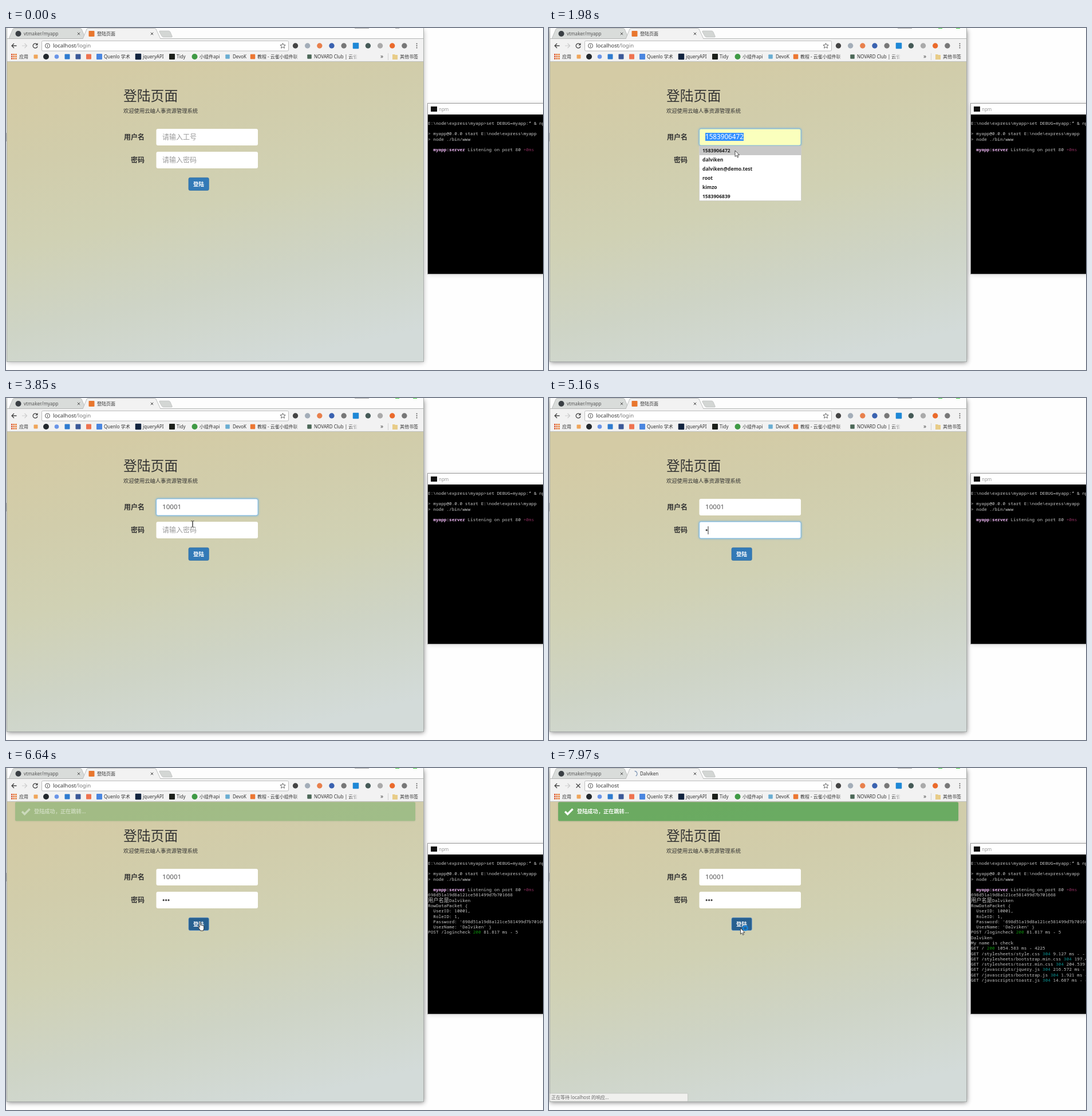
Write an HTML page that moves like this. It is 938 px wide and 597 px high and loops after 8 s.

```html
<!DOCTYPE html>
<html lang="zh">
<head>
<meta charset="utf-8">
<title>登陆页面</title>
<style>
html, body { margin: 0; width: 100%; height: 100%; overflow: hidden; background: #fefefe }
svg { display: block; width: 938px; height: 597px }
text { font-family: "Noto Sans", "Noto Sans CJK SC", sans-serif; white-space: pre }
.mono { font-family: "Noto Sans Mono", "Noto Sans CJK SC", monospace }
</style>
</head>
<body>
<svg viewBox="0 0 938 597">
  <defs>
    <linearGradient id="page" x1=".34" y1="0" x2=".66" y2="1">
      <stop offset="0" stop-color="#d4cba5"/>
      <stop offset=".22" stop-color="#d1cdab"/>
      <stop offset=".47" stop-color="#d0d1b4"/>
      <stop offset=".73" stop-color="#ced4c6"/>
      <stop offset="1" stop-color="#d3dbd9"/>
    </linearGradient>
    <linearGradient id="fade">
      <stop offset="0" stop-color="#f2f2f2" stop-opacity="0"/>
      <stop offset="1" stop-color="#f2f2f2"/>
    </linearGradient>
    <filter id="blur" x="-10%" y="-10%" width="120%" height="120%"><feGaussianBlur stdDeviation="4"/></filter>
    <filter id="glow" x="-10%" y="-40%" width="120%" height="180%"><feGaussianBlur stdDeviation="1.4"/></filter>
  </defs>
  <g id="base"></g>
  <g id="live"></g>
</svg>
<script>
const LOOP = 8000, USER = 'Dalviken', HASH = '698d51a19d8a121ce581499d7b701668';
const base = document.getElementById('base'), live = document.getElementById('live');

const text = (x, y, size, str, fill = '#333', more = '') =>
  `<text x="${x}" y="${y}" font-size="${size}" fill="${fill}" ${more}>${str}</text>`;
const rect = (x, y, w, h, fill, more = '') =>
  `<rect x="${x}" y="${y}" width="${w}" height="${h}" fill="${fill}" ${more}/>`;
const dot = (x, y, r, fill, more = '') => `<circle cx="${x}" cy="${y}" r="${r}" fill="${fill}" ${more}/>`;
const path = (d, fill, stroke = 'none', w = 1, more = '') =>
  `<path d="${d}" fill="${fill}" stroke="${stroke}" stroke-width="${w}" ${more}/>`;
const square = (x, y, s, fill) => rect(x - s / 2, y - s / 2, s, s, fill, 'rx="1"');
const bold = 'font-weight="700"';
const cross = (x, y, s, color, w) => path(`M${x - s} ${y - s}l${2 * s} ${2 * s}m0 ${-2 * s}l${-2 * s} ${2 * s}`, 'none', color, w);

function drawBase() {
  let s = rect(0, 0, 938, 597, '#fefefe') + rect(0, 183, 1.5, 15, '#bbb');
  s += rect(2, 4, 728, 580, '#000', 'id="shade" filter="url(#blur)"');
  s += rect(1, -2, 729, 585, '#a9adab') + rect(2, -2, 727, 20, '#fdfdfd');
  s += rect(609, 0, 25, 1, '#aaa');

  // tabs
  s += path('M5 18.5L12 2Q13 .5 15 .5H129Q131 .5 132 2L139 18.5Z', '#d9dcda', '#b0b3b1', .8);
  s += rect(2, 18, 727, 1, '#b4b6b5');
  s += path('M134 19L141 2Q142 .5 144 .5H259Q261 .5 262 2L270 19', '#f2f2f2', '#b0b3b1', .8);
  s += path('M268 7Q267 5 269 5H284Q286 5 287 7L290 14Q291 16 289 16H275Q273 16 272 14Z', '#d3d6d4', '#b4b6b5', .6);
  s += dot(21.5, 10, 5, '#3a3f44') + text(31, 12.8, 8.1, 'vtmaker/myapp', '#555');
  s += cross(127, 10, 2.2, '#555', 1) + cross(255, 10, 2.2, '#444', 1);

  // toolbar
  s += rect(2, 19, 727, 39, '#f2f2f2') + rect(2, 58, 727, 1, '#bfc1bd');
  s += path('M18.5 31H10M14 27l-4 4 4 4', 'none', '#444', 1.3);
  s += path('M28 31h8.5M32.5 27l4 4-4 4', 'none', '#ccc', 1.2);
  s += rect(62.5, 22.5, 431, 17.5, '#fff', 'rx="2" stroke="#bcbcbc"');
  s += dot(72.5, 31, 4, 'none', 'stroke="#555"') + rect(72, 30.2, 1, 3.2, '#555') + rect(72, 28.6, 1, 1, '#555');
  s += path('M483.5 26.5l1.3 3 3.3.3-2.5 2.2.8 3.2-2.9-1.7-2.9 1.7.8-3.2-2.5-2.2 3.3-.3Z', 'none', '#555', .9);
  ['#444', '#a3adb8', '#e8804c', '#3a62b0', '#777', '#1e88d6', '#455a57', '#aaa', '#ea6a2b', '#777'].forEach((c, i) =>
    s += i == 5 ? square(611, 31, 10.5, c) : dot(505.5 + 21.15 * i, 31, 4.7, c));
  for (let i = -1; i < 2; i++) s += dot(717.5, 31 + 3.6 * i, 1, '#555');

  // bookmarks
  for (let i = 0; i < 9; i++) s += rect(9 + i % 3 * 3.6, 45 + (i / 3 | 0) * 3.6, 2.5, 2.5, i % 3 ? '#e8742c' : '#d9512c');
  s += square(52, 50, 7, '#efa55a') + dot(70, 50, 5, '#24292e') + dot(88.5, 50, 3.8, '#6a95e8');
  s += square(107, 50, 9, '#2f7cd0') + square(126, 50, 9, '#3b5998') + square(144.5, 50, 9, '#ee7350');
  s += square(163, 50, 10, '#4a86e0') + square(231, 50, 10.5, '#12243f') + square(290, 50, 10, '#1d211c');
  s += dot(329.5, 50, 5, '#3f9a45') + square(387, 50, 7.5, '#6aaed2') + square(431, 50, 8.5, '#ec7733') + square(530, 50, 7.5, '#4c6858');
  [[23, '应用'], [171, 'Quenlo 学术'], [239, 'jqueryAPI'], [298, 'Tidy'], [338, '小组件api'], [396, 'DevoK'],
    [439, '教程 - 云雀小组件联'], [538, 'NOVARD Club | 云雀'], [688, '其他书签']]
    .forEach(([x, str]) => s += text(x, 53, 8, str));
  s += rect(502, 44, 14, 12, 'url(#fade)') + rect(516, 44, 9, 12, '#f2f2f2');
  s += rect(600, 44, 15, 12, 'url(#fade)') + rect(615, 44, 30, 12, '#f2f2f2');
  s += text(654, 53, 10, '»', '#444') + rect(667, 44, 1, 12, '#d0d0d0');
  s += path('M675 46h4l1 1h4v8h-9Z', '#e8cc88');

  // page
  s += rect(2, 59, 727, 523, 'url(#page)');
  s += text(205, 127.2, 23.8, '登陆页面') + text(205, 148, 9.3, '欢迎使用云岫人事资源管理系统');
  s += text(206, 194.8, 12, '用户名', '#333', bold) + text(218, 234.8, 12, '密码', '#333', bold);

  // terminal window
  s += rect(738, 133, 210, 297, '#000', 'filter="url(#blur)" opacity=".2"');
  s += rect(736.5, 131.5, 210, 298, '#fff', 'stroke="#999"') + rect(737, 151, 201, 278, '#000');
  s += rect(742, 137, 11, 9, '#111') + text(756, 144.5, 8, 'npm', '#999');
  base.innerHTML = s;
}

const mono = (str, fill) => `<tspan fill="${fill}">${str}</tspan>`;
const get = (file, tail) => `GET /${file} ${tail}`;
// [time shown, row, line]
const log = [
  [0, 0, String.raw`E:\node\express\myapp&gt;set DEBUG=myapp:* &amp; npm start`],
  [0, 2, String.raw`&gt; myapp@0.0.0 start E:\node\express\myapp`],
  [0, 3, '&gt; node ./bin/www'],
  [0, 5, `  <tspan fill="#eab4f0" ${bold}>myapp:server</tspan> Listening on port 80 ${mono('+0ms', '#8a2c5c')}`],
  [6240, 6, HASH],
  [6240, 7, `<tspan font-size="9.28">用户名是</tspan>${USER}`],
  [6400, 8, 'RowDataPacket {'],
  [6400, 9, '  UserID: 10001,'],
  [6400, 10, '  RoleID: 1,'],
  [6400, 11, `  Password: '${HASH}',`],
  [6400, 12, `  UserName: '${USER}' }`],
  [6480, 13, 'POST /logincheck 200 81.817 ms - 5'],
  [6720, 14, USER],
  [6720, 15, 'My name is check'],
  [7330, 16, get('', '200 1054.583 ms - 4225')],
  [7560, 17, get('stylesheets/style.css', '304 9.127 ms - -')],
  [7720, 18, get('stylesheets/bootstrap.min.css', '304 197.482 ms - -')],
  [7720, 19, get('stylesheets/toastr.min.css', '304 204.539 ms - -')],
  [7800, 20, get('javascripts/jquery.js', '304 216.572 ms - -')],
  [7880, 21, get('javascripts/bootstrap.js', '304 1.921 ms - -')],
  [7960, 22, get('javascripts/toastr.js', '304 14.687 ms - -')]
];
const paint = line => line.replace(/ (200|304) /, (m, n) => mono(m, n == 200 ? '#0c8f0c' : '#0a8f8f'));

// [time, x, y, shape]; an empty shape hides the pointer
const moves = [
  [0, 0, 0, ''], [350, 814, 579, 'arrow'], [430, 740, 500, 'arrow'], [510, 610, 408, 'arrow'],
  [590, 480, 330, 'arrow'], [670, 390, 289, 'arrow'], [740, 340, 269, 'hand'], [810, 336, 254, 'arrow'],
  [890, 328, 215, 'beam'], [970, 325, 187, 'beam'], [1830, 325, 196, 'beam'], [1900, 325, 208, 'arrow'],
  [1980, 325, 214, 'arrow'], [2420, 0, 0, ''], [3850, 326, 220, 'beam'], [3930, 326, 226, 'beam'],
  [4000, 325.5, 230.5, 'beam'], [4470, 0, 0, ''], [5630, 326, 231, 'beam'], [5710, 328, 240, 'beam'],
  [5780, 333, 254, 'arrow'], [5850, 336, 267, 'hand'], [5920, 336, 269, 'hand'], [6800, 338, 269, 'hand'],
  [7560, 337, 276, 'busy'], [7640, 334.5, 279.5, 'busy']
];
const arrow = path('M0 0V10.5L2.5 8.3 4.2 12 5.9 11.2 4.3 7.7H7.5Z', '#fff', '#222', .8);
const shapes = {
  '': '',
  arrow,
  beam: path('M-2.5-5.5Q0-5.5 0-4.5V4.5Q0 5.5-2.5 5.5M2.5-5.5Q0-5.5 0-4.5V4.5Q0 5.5 2.5 5.5', 'none', '#333', .9),
  hand: path('M2.2 1.2Q2.2 0 3.2 0T4.2 1.2V5.3Q5.5 4.8 6.2 5.7 7.3 5.2 8 6.3 9.7 6.2 9.7 7.8V11.5L8.5 15H3.7L.3 9.8Q-.4 8.5.6 8.1T2.2 9.3Z', '#fff', '#222', .9),
  busy: dot(8.5, 0, 3.8, 'none', 'stroke="#1783d8" stroke-width="2.4"') + arrow
};

const last = (list, t) => list.filter(k => k[0] <= t).pop();

function field(y, focus, fill = '#fff') {
  const box = (color, more = '') => rect(262.5, y, 177.5, 29, color, `rx="3" ${more}`);
  if (!focus) return box(fill);
  return box('none', 'stroke="#66afe9" stroke-width="3" filter="url(#glow)" opacity=".6"') +
    box(fill, 'stroke="#66afe9" stroke-width=".8"');
}

const all = ['1583906472', 'dalviken', 'dalviken@demo.test', 'root', 'kimzo', '1583906839'];
const ones = ['1583906472', '1583906839', '1029', '12', '1360', '11'];
function menu(t) {
  const items = t < 2420 ? all : t < 2660 ? ones : ['1029'];
  let s = rect(262.5, 206, 178, 16 * items.length - .5, '#fff', 'stroke="#c4c4c4" stroke-width=".6"');
  if (t >= 1900 && t < 2420) s += rect(263, 206, 177.5, 16, '#c8c8c8');
  items.forEach((str, i) => s += text(268, 217.3 + 15.9 * i, 8.5, str, '#222', bold));
  return s;
}

function form(t) {
  const preview = t >= 1900 && t < 2420;
  const typed = last([[0, 0], [2420, 1], [2660, 2], [2810, 3], [2980, 4], [3310, 5]], t)[1];
  const dots = last([[0, 0], [5160, 1], [5390, 2], [5550, 3]], t)[1];
  const userFocus = t >= 1120 && t < 4150, passFocus = t >= 4150 && t < 6000;
  const hover = t >= 740 && t < 810 || t >= 5850;
  const caret = (x, y) => rect(x, y, 1, 14, '#333');

  let s = field(176, userFocus, preview ? '#faffbd' : '#fff');
  if (preview) s += rect(273, 183, 67, 14, '#3390ff') + text(273, 194.3, 11.7, all[0], '#fff');
  else if (typed) s += text(273, 194.3, 11.6, '10001'.slice(0, typed), '#555');
  else s += text(273, 194.8, 12, '请输入工号', '#999');
  if (userFocus && !preview && t < 3850) s += caret(273 + 6.65 * typed, 183.5);

  s += field(216, passFocus);
  if (!dots) s += text(273, 234.8, 12, '请输入密码', '#999');
  for (let i = 0; i < dots; i++) s += dot(275.2 + 4.4 * i, 230.7, 1.6, '#444');
  if (passFocus && (t < 4860 || t >= 5160)) s += caret(273 + 4.5 * dots, 224);

  s += rect(319, 261.3, 35.3, 22.2, hover ? '#286090' : '#337ab7',
    `rx="2.5" stroke="${t >= 6000 ? '#5b93cf' : hover ? '#204d74' : '#2e6da4'}" stroke-width=".7"`);
  s += text(327, 275.8, 9.4, '登陆', '#fff', bold);
  if (t >= 1360 && t < 2980) s += menu(t);
  return s;
}

function toast(t) {
  const p = Math.min(1, (t - 6500) / 300);
  if (p <= 0) return '';
  return `<g opacity="${.8 * p}">` + rect(16, 59.5, 699, 33.5, '#777', 'rx="2" filter="url(#glow)" opacity=".4"') +
    rect(16, 59.5, 699, 33, '#51a351', 'rx="2"') + '</g>' +
    `<g opacity="${.95 * p}">` + path('M28 76l4.5 4.5 9-9', 'none', '#fff', 3.4) +
    text(49, 79.3, 9.2, '登陆成功，正在跳转...', '#fff', bold) + '</g>';
}

function browser(t) {
  const loading = t >= 6720, arrived = t >= 7400;
  let s = '';
  if (t >= 1120) s += rect(680, 0, 7, 1, '#3fd23f') + rect(711, 0, 7, 1, '#3fd23f');
  else s += rect(680, 0, 7, 1, '#aaa');
  if (loading) {
    const turn = arrived ? (t - 7970) * .36 : (6880 - t) * .18 - 90;
    const arc = arrived ? 'M149.5 5.5A4.5 4.5 0 0 1 151.7 13.9' : 'M149.5 5.5A4.5 4.5 0 0 1 154 10';
    s += path(arc, 'none', arrived ? '#8299b8' : '#c9b48a', 1.3, `transform="rotate(${turn} 149.5 10)"`);
    s += cross(51, 31, 3.5, '#444', 1.3);
    s += rect(1.5, 568, 241, 14, '#f0f0ee', 'rx="1" stroke="#b9bcb9" stroke-width=".7"') +
      text(4, 578, 8, '正在等待 localhost 的响应...', '#666');
  } else {
    s += square(149.5, 10, 10, '#e8772e');
    s += path('M54 28.3A4 4 0 1 0 55 32', 'none', '#444', 1.3) + path('M55.5 26v4.2h-4.2Z', '#444');
  }
  s += text(159, 12.8, 8, arrived ? USER : '登陆页面');
  s += text(82, 34.3, 9.5, 'localhost' + (arrived ? '' : mono('/login', '#777')));
  return s;
}

function draw(t) {
  document.getElementById('shade').setAttribute('opacity', t >= 1120 ? .5 : .28);
  let s = browser(t) + form(t) + toast(t);
  for (const [at, row, line] of log)
    if (t >= at) s += text(737, (168.8 + 9.28 * row).toFixed(2), 7.73, paint(line), '#c8c8c8', 'class="mono"');
  const [, x, y, shape] = last(moves, t);
  live.innerHTML = s + `<g transform="translate(${x} ${y})">${shapes[shape]}</g>`;
}

drawBase();
const start = performance.now();
(function tick() {
  draw((performance.now() - start) % LOOP);
  requestAnimationFrame(tick);
})();
</script>
</body>
</html>
```
